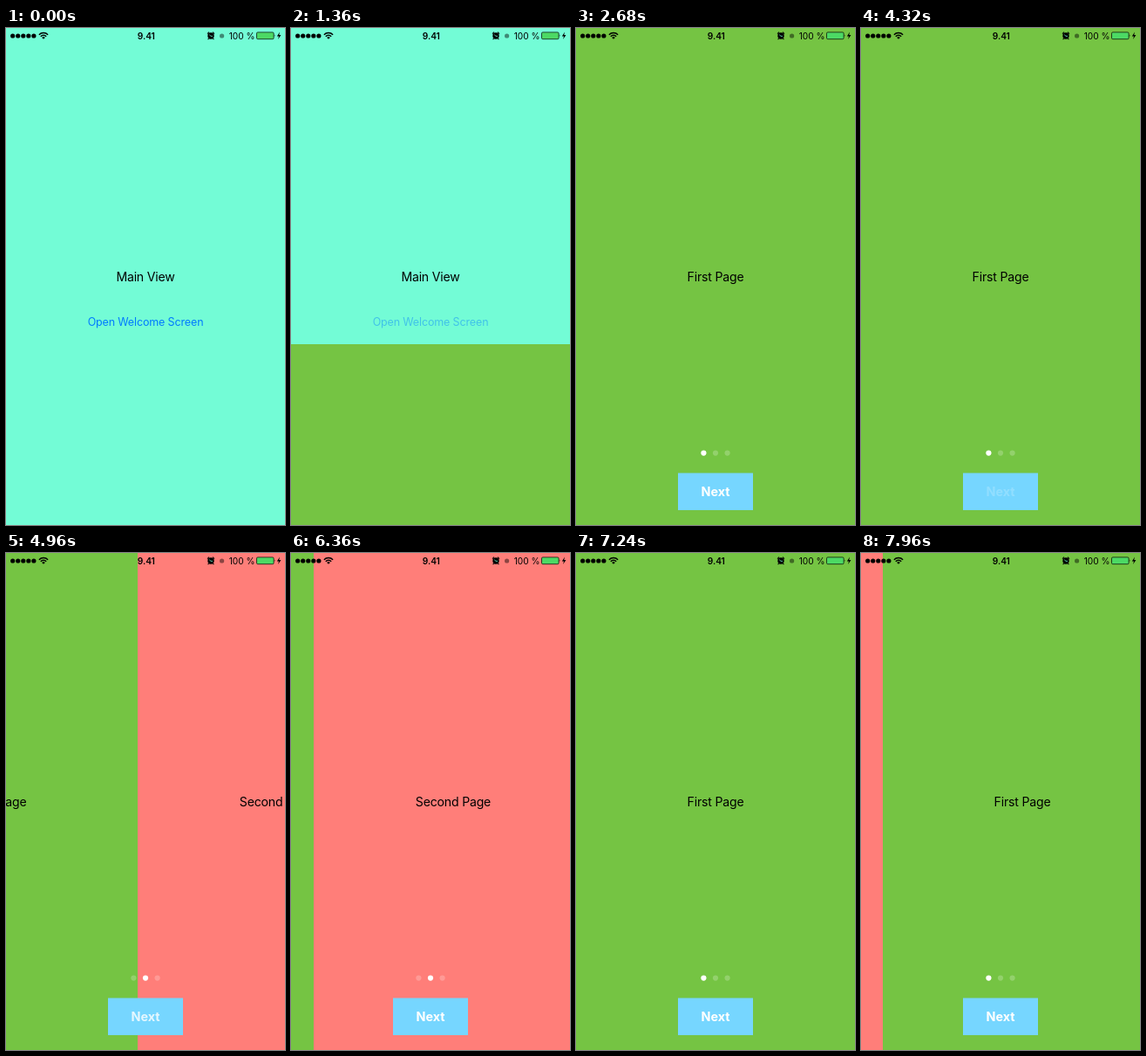
Recreate the animation shown at these times as an HTML page. Size 320 px wide and 569 px high, loop 8000 ms.

```html
<!DOCTYPE html>
<html lang="en">
<head>
<meta charset="utf-8">
<title>Welcome screen</title>
<style>
  html, body { margin: 0; width: 100%; height: 100%; overflow: hidden; background: #73fcd6; }
  svg { display: block; width: 100vw; height: 100vh; }
  text { font-family: Inter, Roboto, sans-serif; text-anchor: middle; }
  .title { font-size: 14.1px; letter-spacing: -.2px; }
  .link { font-size: 12.5px; letter-spacing: -.14px; fill: #007aff; }
  .next { font-size: 14.4px; font-weight: 700; fill: #fff; }
  .status text { font-size: 10.2px; }
</style>
</head>
<body>
<svg viewBox="0 0 320 569" preserveAspectRatio="none">
  <rect width="320" height="569" fill="#73fcd6"/>
  <text class="title" x="160" y="290">Main View</text>
  <text id="link" class="link" x="160" y="341">Open Welcome Screen</text>

  <g id="welcome">
    <g id="pages">
      <rect x="-320" width="321" height="569" fill="#ff7e79"/>
      <rect x="320" width="320" height="569" fill="#ff7e79"/>
      <rect width="320" height="569" fill="#75c443"/>
      <text class="title" x="160" y="290">First Page</text>
      <text class="title" x="480" y="290">Second Page</text>
    </g>
    <g id="dots" fill="#fff"></g>
    <rect x="117" y="509.5" width="86" height="42.5" fill="#76d6ff"/>
    <text id="next" class="next" x="160" y="536">Next</text>
  </g>

  <g class="status">
    <g id="signal"></g>
    <g fill="none" stroke="#000" stroke-width="1.5">
      <path d="M37.9 7.7a7.2 7.2 0 0 1 10.2 0M39.8 9.7a4.5 4.5 0 0 1 6.4 0"/>
    </g>
    <path d="M41.2 10.9a2.6 2.6 0 0 1 3.6 0L43 12.7Z"/>
    <text x="160.8" y="12.6" font-weight="600">9.41</text>
    <circle cx="235" cy="9" r="3.7"/>
    <path d="M231 6.6l2-1.9M239 6.6l-2-1.9M232.6 12l-1 1.1M237.4 12l1 1.1" stroke="#000" stroke-width="1.1"/>
    <path d="M233.2 7.7L235 9.3H237" fill="none" stroke="#73fcd6" stroke-width=".8"/>
    <circle cx="247.6" cy="9" r="2.6" opacity=".45"/>
    <text x="270.6" y="12.6">100 %</text>
    <rect x="287.5" y="4.9" width="19.6" height="7.8" rx="1.3" fill="#4cd964" stroke="#000" stroke-width=".7"/>
    <path d="M307.8 7.3q1.3 1.5 0 3Z"/>
    <path d="M314 4.6L310.8 9.4H313L312 13L315.4 8.1H313.2Z"/>
  </g>
</svg>
<script>
const LOOP = 8000, STEP = 40, WIDTH = 320, HEIGHT = 569;
const el = id => document.getElementById(id);
const clamp = v => Math.min(1, Math.max(0, v));
const smooth = v => { v = clamp(v); return v * v * (3 - 2 * v); };
const mix = (a, b, k) => a + (b - a) * k;

// Critically damped spring from 0 to 1; rate is per second.
const spring = (ms, rate) => {
  const x = Math.max(0, ms) * rate / 1000;
  return 1 - (1 + x) * Math.exp(-x);
};

function addCircles(parent, count, x, y, gap, r) {
  return Array.from({ length: count }, (_, i) => {
    const c = document.createElementNS("http://www.w3.org/2000/svg", "circle");
    const attrs = { cx: x + i * gap, cy: y, r };
    for (const name in attrs) c.setAttribute(name, attrs[name]);
    return parent.appendChild(c);
  });
}
addCircles(el("signal"), 5, 7.7, 9, 6.05, 2.6);
const dots = addCircles(el("dots"), 3, 146.4, 486.6, 13.6, 3.1);

// Opacity of a button title that dims on touch and fades back on release.
const pressed = (t, down, up) => t < down ? 1 : mix(.2, 1, smooth((t - up) / 470));

// Horizontal shift of the page strip.
function pageShift(t) {
  if (t < 6360) return -WIDTH * smooth((t - 4545) / 800);
  if (t < 7200) return -mix(WIDTH - 26, 0, spring(t - 6420, 10.5));
  if (t < 7700) return 58 * smooth((t - 7340) / 360);
  return mix(58, 25, smooth((t - 7700) / 260));
}

function render(t) {
  const top = HEIGHT * (1 - spring(t - 1211, 8.54));
  const current = t >= 4560 && t < 7200 ? 1 : 0;
  el("link").setAttribute("opacity", pressed(t, 800, 1190));
  el("next").setAttribute("opacity", pressed(t, 4320, 4640));
  el("welcome").setAttribute("transform", `translate(0 ${Math.round(top)})`);
  el("pages").setAttribute("transform", `translate(${Math.round(pageShift(t))} 0)`);
  dots.forEach((dot, i) => dot.setAttribute("opacity", i === current ? 1 : .22));
}

const start = performance.now();
function tick() {
  const t = (performance.now() - start) % LOOP;
  render(Math.floor(t / STEP) * STEP);
  requestAnimationFrame(tick);
}
render(0);
requestAnimationFrame(tick);
</script>
</body>
</html>
```
